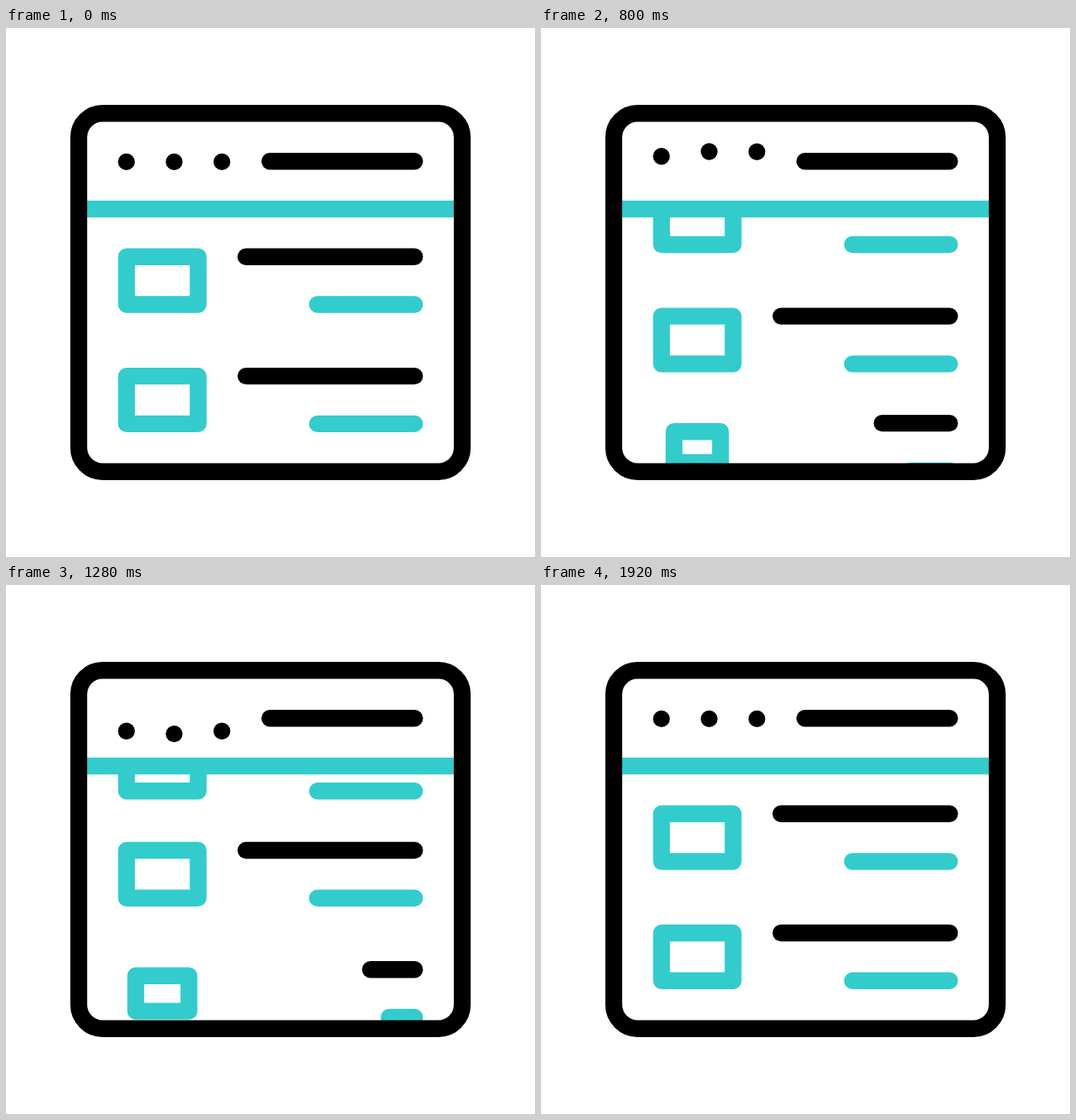
Animation, 640 px wide and 640 px high, one loop 2 s. Source, as an HTML page with a canvas:

```html
<!DOCTYPE html>
<html lang="en">
<head>
<meta charset="utf-8">
<title>Scrolling page icon</title>
<style>
  html, body { margin: 0; width: 100%; height: 100%; overflow: hidden; background: #fff; }
  canvas { display: block; }
</style>
</head>
<body>
<canvas id="stage" width="640" height="640"></canvas>
<script>
const ctx = document.getElementById('stage').getContext('2d');
const BLACK = '#000', TEAL = '#33cccc';
const LOOP = 2000, STEP = 40;
const SCROLL = 273.9;
const ROWS = [
  { y: 276.7 },
  { y: 421.1 },
  { y: 550.6, boxStart: 420, lineStart: 603 },
  { y: 694.9, boxStart: 861, lineStart: 1122 }
];
const DOT_KEYS = [[160, 161.9], [640, 149.1], [1160, 180.1], [1560, 161.9]];

// Symmetric cubic Bezier easing (a, 0, 1 - a, 1) over a time span.
function ease(t, start, length, a = 0.42) {
  const x = (t - start) / length;
  if (x <= 0) return 0;
  if (x >= 1) return 1;
  let lo = 0, hi = 1, s;
  for (let i = 0; i < 30; i++) {
    s = (lo + hi) / 2;
    const bx = 3 * a * s * (1 - s) ** 2 + 3 * (1 - a) * s * s * (1 - s) + s ** 3;
    if (bx < x) lo = s; else hi = s;
  }
  return s * s * (3 - 2 * s);
}

function dotY(t) {
  let y = DOT_KEYS[0][1];
  for (let i = 1; i < DOT_KEYS.length; i++) {
    const [t0, y0] = DOT_KEYS[i - 1], [t1, y1] = DOT_KEYS[i];
    y += (y1 - y0) * ease(t, t0, t1 - t0);
  }
  return y;
}

function line(x0, x1, y, color) {
  ctx.strokeStyle = color;
  ctx.beginPath();
  ctx.moveTo(x0, y);
  ctx.lineTo(x1, y);
  ctx.stroke();
}

function drawRow(row, t, y) {
  const size = row.boxStart ? ease(t, row.boxStart, 646) : 1;
  const grow = row.lineStart ? ease(t, row.lineStart, 446) : 1;
  if (size > 0) {
    const w = 86.7 * size, h = 57.8 * size;
    ctx.strokeStyle = TEAL;
    ctx.strokeRect(189.1 - w / 2, y + 28.9 - h / 2, w, h);
  }
  if (grow > 0) {
    line(494.3 - 204 * grow, 494.3, y, BLACK);
    line(494.3 - 117.5 * grow, 494.3, y + 57.8, TEAL);
  }
}

function draw(t) {
  ctx.fillStyle = '#fff';
  ctx.fillRect(0, 0, 640, 640);
  ctx.lineWidth = 20.4;
  ctx.lineCap = ctx.lineJoin = 'round';

  ctx.save();
  ctx.beginPath();
  ctx.rect(98, 229, 444, 298);
  ctx.clip();
  const shift = SCROLL * ease(t, 40, 1880, 0.64);
  for (const row of ROWS) drawRow(row, t, row.y - shift);
  ctx.restore();

  ctx.fillStyle = TEAL;
  ctx.fillRect(90, 208.8, 460, 20.4);
  line(319.2, 494.3, 161.2, BLACK);

  ctx.fillStyle = BLACK;
  for (let i = 0; i < 3; i++) {
    ctx.beginPath();
    ctx.arc(145.7 + 57.75 * i, dotY(t - 120 * i), 10.2, 0, 2 * Math.PI);
    ctx.fill();
  }

  ctx.strokeStyle = BLACK;
  ctx.beginPath();
  ctx.roundRect(88, 103.2, 464, 433.5, 28.9);
  ctx.stroke();
}

const begin = performance.now();
function tick() {
  const t = (performance.now() - begin) % LOOP;
  draw(Math.floor(t / STEP) * STEP);
  requestAnimationFrame(tick);
}
tick();
</script>
</body>
</html>
```
